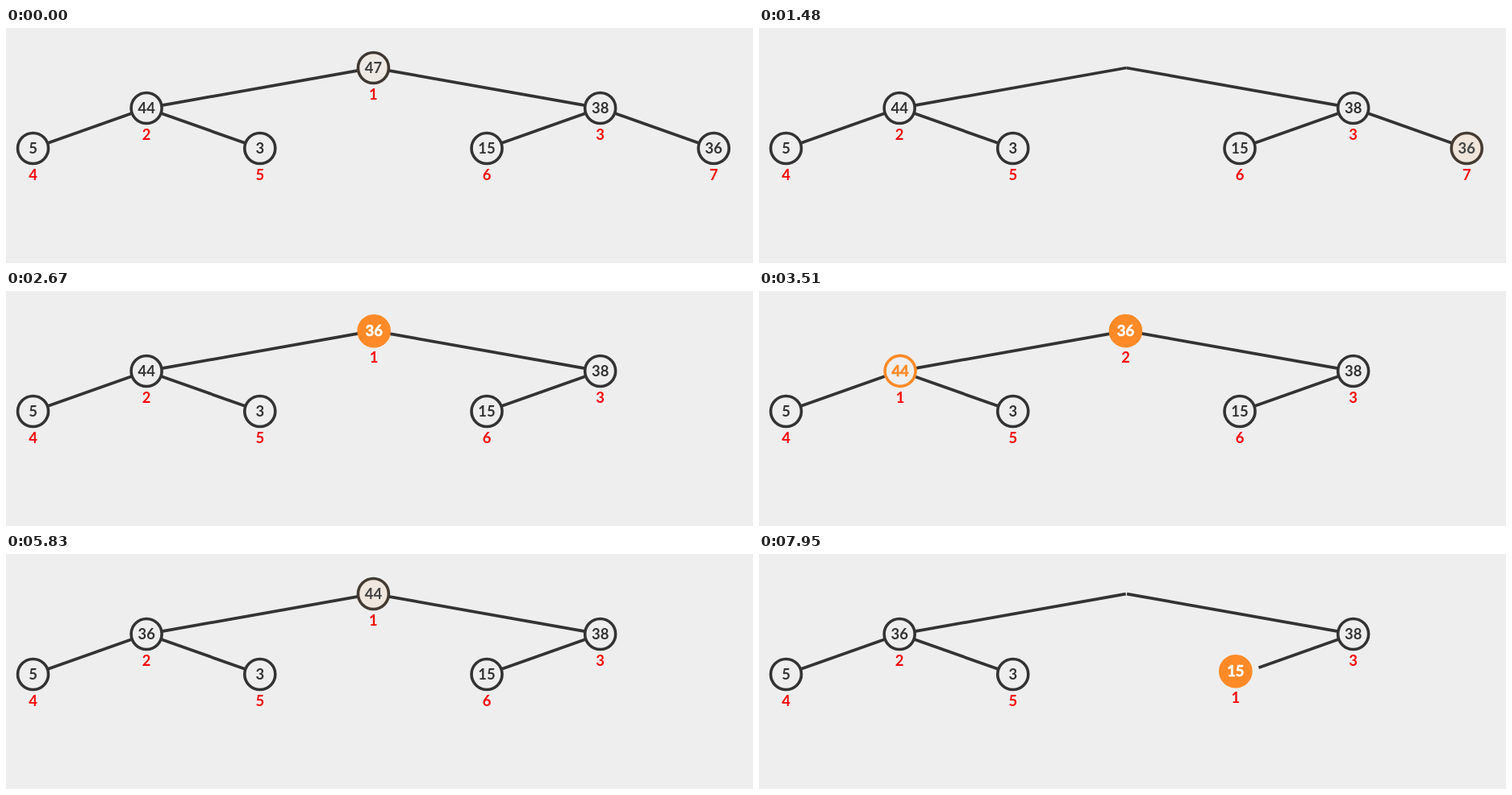
Write an HTML page that moves like this. It is 926 px wide and 292 px high and loops after 8000 ms.

```html
<!DOCTYPE html>
<html lang="en">
<head>
<meta charset="utf-8">
<title>Binary heap</title>
<style>
  html, body { margin: 0; width: 100%; height: 100%; overflow: hidden; background: #eee; }
  svg { display: block; width: 926px; height: 292px; }
  text { font-family: Lato, "Open Sans", sans-serif; font-weight: 700; text-anchor: middle; }
  .edge { stroke: #333; stroke-width: 3.75; }
</style>
</head>
<body>
<svg id="stage" viewBox="0 0 926 292"></svg>
<script>
const LOOP = 8000, STEP = 720;
const RADIUS = 20.8, RING = 3.6, FONT = 18.4;
const PAPER = [238, 238, 238], INK = [51, 51, 51], ORANGE = [255, 138, 39], WHITE = [255, 255, 255];

// Start times of the transitions, each lasting STEP
const START = {
  pickTop: -168, dropTop: 554, pickLast: 1275, liftLast: 2006, compare: 2725, swap: 3444,
  pickTop2: 5635, dropTop2: 6350, pickLast2: 7075, liftLast2: 7800
};

// Slots of the tree, numbered from 1, evenly spread on each row
const SLOTS = [null];
for (let i = 1; i <= 7; i++) {
  const depth = Math.floor(Math.log2(i)), count = 2 ** depth;
  SLOTS.push({ x: 455.4 + (i - count - (count - 1) / 2) * 1125 / count, y: 49.5 + 50 * depth });
}

// Value and starting slot
const NODES = [[47, 1], [44, 2], [38, 3], [5, 4], [3, 5], [15, 6], [36, 7]];

const mix = (a, b, p) => a + (b - a) * p;
const move = (a, b, p) => ({ x: mix(a.x, b.x, p), y: mix(a.y, b.y, p) });
const blend = (a, b, p) => a.map((v, i) => mix(v, b[i], p));
const rgb = c => `rgb(${c.map(Math.round).join()})`;
const ease = u => u < 0.5 ? 4 * u ** 3 : 1 - 4 * (1 - u) ** 3;

function progress(t) {
  const p = {};
  for (const k in START) p[k] = ease(Math.min(1, Math.max(0, (t - START[k]) / STEP)));
  return p;
}

const stage = document.getElementById("stage");
function add(tag, parent, attrs = {}) {
  const el = document.createElementNS("http://www.w3.org/2000/svg", tag);
  parent.appendChild(el);
  return set(el, attrs);
}
function set(el, attrs) {
  for (const k in attrs) el.setAttribute(k, attrs[k]);
  return el;
}

const edgeLayer = add("g", stage), ringLayer = add("g", stage), textLayer = add("g", stage);
const edges = [2, 3, 4, 5, 6, 7].map(child => ({ child, el: add("line", edgeLayer, { class: "edge" }) }));
const nodes = NODES.map(([value, slot]) => {
  const n = {
    value, slot,
    ring: add("circle", ringLayer),
    num: add("text", textLayer),
    tag: add("text", textLayer, { fill: "#f5060a" })
  };
  n.num.textContent = value;
  return n;
});

// Pose of a node: place, size, fill amount, outline amount and index
function pose(n, p, t) {
  const s = { ...SLOTS[n.slot], size: 1, solid: 0, outline: 0, index: n.slot };
  const top = SLOTS[1], left = SLOTS[2];
  if (n.value === 47) {
    s.solid = p.pickTop;
    s.size = 1 - p.dropTop;
  } else if (n.value === 44) {
    Object.assign(s, move(left, top, p.swap));
    s.outline = p.compare - p.swap;
    s.solid = p.pickTop2;
    s.size = 1 - p.dropTop2;
    if (t >= START.swap) s.index = 1;
  } else if (n.value === 36) {
    Object.assign(s, t < START.swap ? move(SLOTS[7], top, p.liftLast) : move(top, left, p.swap));
    s.solid = p.pickLast - p.swap;
    if (t >= START.liftLast) s.index = t < START.swap ? 1 : 2;
  } else if (n.value === 15) {
    Object.assign(s, move(SLOTS[6], top, p.liftLast2));
    s.solid = p.pickLast2;
    if (t >= START.liftLast2) s.index = 1;
  }
  return s;
}

function drawNode(n, p, t) {
  const s = pose(n, p, t);
  const shown = s.size > 0.002 ? "inline" : "none";
  const ink = rgb(s.solid > 0 ? blend(INK, WHITE, s.solid) : blend(INK, ORANGE, s.outline));
  set(n.ring, {
    cx: s.x, cy: s.y, r: (RADIUS - RING / 2) * s.size, display: shown,
    fill: rgb(blend(PAPER, ORANGE, s.solid)),
    stroke: rgb(blend(INK, ORANGE, Math.max(s.solid, s.outline))),
    "stroke-width": RING * s.size
  });
  const size = FONT * s.size;
  set(n.num, {
    x: s.x, y: s.y + 6.6, "font-size": size, display: shown,
    fill: ink, stroke: ink, "stroke-width": 0.6 * Math.max(s.solid, s.outline)
  });
  set(n.tag, { x: s.x, y: s.y + 39.3, "font-size": size, display: shown });
  n.tag.textContent = s.index;
}

function drawEdge({ child, el }, p) {
  const a = SLOTS[child >> 1], b = SLOTS[child];
  const len = Math.hypot(b.x - a.x, b.y - a.y);
  const rim = RADIUS - 1.5;
  const topSize = 1 - p.dropTop + p.liftLast - p.dropTop2 + p.liftLast2;
  const pull = child === 7 ? p.liftLast : child === 6 ? p.liftLast2 : 0;
  const near = child < 4 ? rim * topSize : rim;
  const far = len - rim - len * pull;
  const from = move(a, b, near / len), to = move(a, b, far / len);
  set(el, { x1: from.x, y1: from.y, x2: to.x, y2: to.y, display: far > near ? "inline" : "none" });
}

function draw(t) {
  const p = progress(t);
  edges.forEach(e => drawEdge(e, p));
  nodes.forEach(n => drawNode(n, p, t));
}

const begin = performance.now();
function tick() {
  draw((performance.now() - begin) % LOOP);
  requestAnimationFrame(tick);
}
draw(0);
requestAnimationFrame(tick);
</script>
</body>
</html>
```
